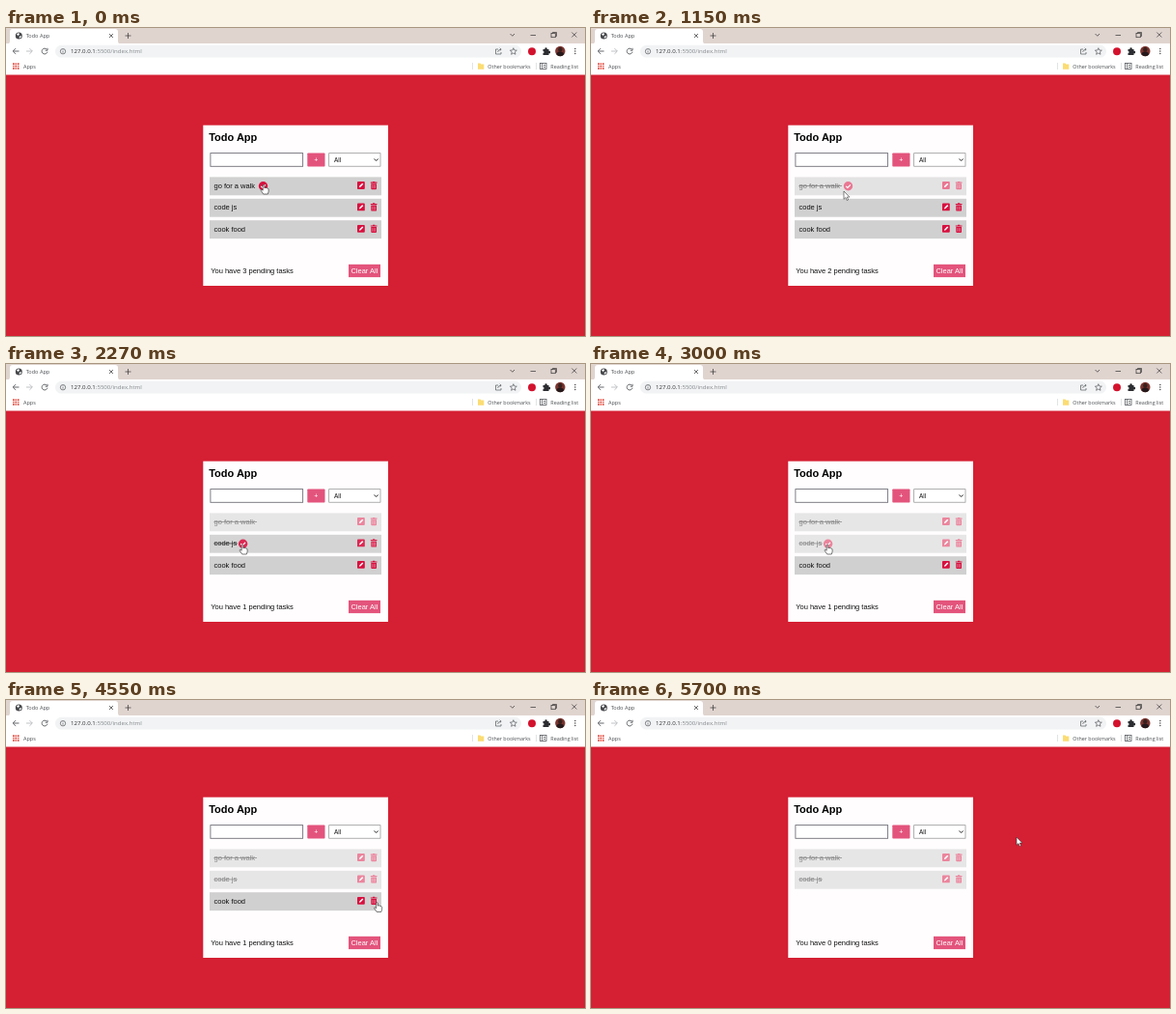
Write an HTML page that moves like this. It is 600x319 px and loops after 5730 ms.

```html
<!DOCTYPE html>
<html lang="en">
<head>
<meta charset="utf-8">
<title>Todo App</title>
<style>
  html, body { margin: 0; width: 100%; height: 100%; overflow: hidden; background: #d51f33; }
  svg { display: block; width: 600px; height: 319px; }
  text { font-family: "Liberation Sans", Arial, sans-serif; font-size: 7.5px; fill: #111; white-space: pre; }
  .ui { font-family: "Open Sans", "Noto Sans", sans-serif; font-size: 5.4px; fill: #4a4d51; }
  .line { fill: none; stroke: #55585c; stroke-width: .9; }
  .dark { fill: none; stroke: #333; stroke-width: .7; }
</style>
</head>
<body>
<svg viewBox="0 0 600 319">
  <rect width="600" height="319" fill="#d51f33"/>

  <g id="browser">
    <rect width="600" height="16.5" fill="#e0d4cf"/>
    <path d="M1 16.5q3 0 3-3V4q0-3 3-3H113q3 0 3 3v9.500q0 3 3 3z" fill="#fff"/>
    <rect y="16" width="600" height="32.500" fill="#fff"/>
    <circle cx="13.300" cy="8" r="3.500" fill="#47494c"/>
    <path d="M11 6.500l2-1.500 1 1.500-1.500 1.500zM13.500 9l2-1 .4 1.300-1.600 1.500z" fill="#fff"/>
    <text class="ui" x="20.700" y="10.200" style="font-size:5.550px">Todo App</text>
    <path class="dark" d="M107 6l4 4m0-4l-4 4M123.500 8h6m-3-3v6"/>
    <path class="dark" d="M522.500 6l2.300 2.300L527 6M543.500 7.500h5.500M586.300 4.500l5 5m0-5l-5 5M566.500 5.500v-1h4v4h-1"/>
    <rect class="dark" x="565" y="5.500" width="4.300" height="4.200"/>

    <path class="line" d="M13.500 24H7.300m2.800-2.900L7.200 24l2.900 2.900"/>
    <path class="line" d="M21 24h6.200m-2.800-2.900L27.300 24l-2.900 2.900" style="stroke:#b9bbbe"/>
    <path class="line" d="M42.300 22.200a2.900 2.900 0 1 0 .6 2.500M43 20.800v2.400h-2.400"/>
    <rect x="51" y="17.800" width="483" height="12.700" rx="6.350" fill="#f1f3f4"/>
    <circle class="line" cx="59" cy="24.200" r="2.700" style="stroke-width:.7"/>
    <path class="line" d="M59 23.800v1.800m0-3v.6" style="stroke-width:.7"/>
    <text class="ui" x="67" y="26.400" style="font-size:6.100px;fill:#85888c"><tspan fill="#303134">127.0.0.1</tspan>:5500/index.html</text>
    <path class="line" d="M510 22h-2.500v5h5.500v-2M509.500 25q.5-2.800 3.500-2.800m-1.300-1.400l1.500 1.400-1.500 1.400" style="stroke-width:.7"/>
    <path class="line" d="M525.800 20.700l1 2.300 2.500.2-1.900 1.600.6 2.500-2.200-1.300-2.200 1.300.6-2.500-1.900-1.600 2.500-.2z" style="stroke-width:.7"/>
    <circle cx="545" cy="24.200" r="4" fill="#d3122d"/>
    <path d="M556.500 22h1.800a1.300 1.300 0 1 1 2.500 0h1.700v1.800a1.300 1.300 0 1 1 0 2.500v1.700h-6v-1.900a1.100 1.100 0 1 0 0-2.200z" fill="#2c2d30"/>
    <circle cx="574.300" cy="24" r="5.200" fill="#7b352f"/>
    <path d="M570.300 27.300q1-3 3.800-3 3 0 4.200 3a5.200 5.200 0 0 1-8 0z" fill="#25191b"/>
    <circle cx="574.300" cy="22.300" r="2.200" fill="#38211f"/>
    <g fill="#444"><circle cx="589.800" cy="21.500" r=".75"/><circle cx="589.800" cy="24" r=".75"/><circle cx="589.800" cy="26.500" r=".75"/></g>

    <g id="dots"></g>
    <text class="ui" x="18" y="41.500" style="font-size:5.500px">Apps</text>
    <path d="M483.500 36v7M549.500 36v7" stroke="#d5d7da" stroke-width=".7"/>
    <path d="M489 36.500h2.500l.8 1h3v5.300H489z" fill="#fbdc74"/>
    <text class="ui" x="499.300" y="41.500">Other bookmarks</text>
    <rect class="line" x="553.500" y="36.500" width="6.500" height="6" style="stroke-width:.8"/>
    <path class="line" d="M555.600 36.500v6M557 38.500h2m-2 2h2" style="stroke-width:.8"/>
    <text class="ui" x="564.300" y="41.500">Reading list</text>
  </g>

  <g id="panel">
    <rect x="204.300" y="100.700" width="191.700" height="166.300" fill="#fffdfe"/>
    <text x="210.200" y="117" style="font-size:11px;font-weight:700;fill:#000">Todo App</text>
    <rect x="211.900" y="129.600" width="95.700" height="13.700" fill="#fff" stroke="#707078" stroke-width=".9"/>
    <rect x="312.300" y="129.400" width="18.200" height="14.200" rx=".8" fill="#e3547c"/>
    <text x="321.400" y="138.800" text-anchor="middle" style="font-size:7px;fill:#fff">+</text>
    <rect x="334.700" y="129.700" width="53.300" height="13.500" fill="#fff" stroke="#8c8c8c" stroke-width=".7"/>
    <text x="340" y="138.800" style="font-size:6.400px">All</text>
    <path d="M381.600 135.500l2 2 2-2" fill="none" stroke="#222" stroke-width="1"/>
    <text id="count" x="212.200" y="254"></text>
    <rect x="355" y="244.800" width="33" height="13.300" fill="#e3547c"/>
    <text x="357.400" y="254.200" style="fill:#fff">Clear All</text>
  </g>

  <g id="rows"></g>

  <g id="cursor">
    <path id="arrow" d="M0 0v8.300l1.900-1.700 1.300 2.900 1.400-.6-1.300-2.800h2.600z" fill="#fff" stroke="#333" stroke-width=".6"/>
    <path id="hand" d="M-.8.600q.8-1.100 1.600 0v3l1.300-.2 1.300.4 1.200.4.500.8v2.300l-.8 2.700H-.3L-2.700 6.500q-.5-1.200.5-1.200l1.400.9z" fill="#fff" stroke="#333" stroke-width=".65" stroke-linejoin="round"/>
  </g>
</svg>

<script>
const LOOP = 5730, FADE = 500;
const $ = id => document.getElementById(id);
const CRIMSON = "#d8103f";

// done: time ticked off; gone: time deleted
const tasks = [
  { label: "go for a walk", y: 154.4, checkX: 266.5, strikeEnd: 260, done: 850 },
  { label: "code js", y: 176.8, checkX: 245.6, strikeEnd: 239.8, done: 2190 },
  { label: "cook food", y: 199.2, gone: 5160 }
];

// time, x, y, hand pointer
const path = [
  [0, 267, 162, 1], [880, 267, 162, 1], [1060, 263, 168, 0], [1150, 262, 169, 0],
  [1350, 256, 179, 0], [1600, 245, 187, 1], [3150, 245, 187, 1], [3260, 253, 189, 0],
  [3900, 357, 196, 0], [4050, 357, 196, 0], [4500, 384.5, 209.5, 1],
  [5250, 384.5, 209.5, 1], [5330, 392, 200, 0], [5650, 441, 142, 0], [LOOP, 441, 142, 0]
];

$("dots").innerHTML = Array.from({ length: 9 }, (_, i) =>
  `<rect x="${7 + i % 3 * 2.4}" y="${36.3 + Math.floor(i / 3) * 2.4}" width="1.7" height="1.7" fill="${i % 2 ? "#e9685c" : "#d9473d"}"/>`).join("");

function rowMarkup({ label, y, checkX, strikeEnd }) {
  const strike = strikeEnd
    ? `<path class="strike" d="M215.500 ${y + 9.1}H${strikeEnd}" stroke="#111" stroke-width=".7"/>` : "";
  const check = checkX
    ? `<g class="check"><circle cx="${checkX}" cy="${y + 9.4}" r="4.700" fill="${CRIMSON}"/>
       <path d="M${checkX - 2.3} ${y + 9.4}l1.700 1.700 3-3.100" fill="none" stroke="#fff" stroke-width="1.200"/></g>` : "";
  return `<g>
    <rect x="211" y="${y}" width="178" height="18.900" fill="#d0d0d0"/>
    <text x="215.500" y="${y + 11.3}">${label}</text>${strike}${check}
    <g transform="translate(364 ${y + 4.7})">
      <rect width="7.800" height="7.800" rx=".9" fill="${CRIMSON}"/>
      <path d="M2 5.900l.3-1.400 2.900-2.900 1.100 1.100-2.900 2.900z" fill="#fff"/>
    </g>
    <g transform="translate(377.800 ${y + 4.5})" fill="${CRIMSON}">
      <path d="M0 .7h2l.4-.7h1.900l.4.700h2v1.100H0zM.5 2.300h5.700v5.100q0 .9-.9.900H1.400q-.9 0-.9-.9z"/>
      <path d="M2 3.400v3.800m1.350-3.800v3.800m1.350-3.800v3.800" stroke="#e9a9b9" stroke-width=".5"/>
    </g></g>`;
}
$("rows").innerHTML = tasks.map(rowMarkup).join("");
tasks.forEach((task, i) => {
  task.el = $("rows").children[i];
  task.strike = task.el.querySelector(".strike");
  task.check = task.el.querySelector(".check");
});

// CSS "ease": cubic-bezier(.25, .1, .25, 1)
function ease(x) {
  if (x <= 0) return 0;
  if (x >= 1) return 1;
  const bez = (s, a, b) => 3 * (1 - s) ** 2 * s * a + 3 * (1 - s) * s * s * b + s ** 3;
  let lo = 0, hi = 1;
  for (let i = 0; i < 20; i++) {
    const mid = (lo + hi) / 2;
    if (bez(mid, .25, .25) < x) lo = mid; else hi = mid;
  }
  return bez(lo, .1, 1);
}

function pointerAt(t) {
  const i = path.findIndex(p => p[0] > t);
  const a = path[i - 1], b = path[i];
  const u = (t - a[0]) / (b[0] - a[0]), k = u * u * (3 - 2 * u);
  return { x: a[1] + (b[1] - a[1]) * k, y: a[2] + (b[2] - a[2]) * k, hand: a[3] };
}

const show = (el, on) => el.style.visibility = on ? "visible" : "hidden";

function draw(t) {
  const p = pointerAt(t);
  $("cursor").setAttribute("transform", `translate(${p.x} ${p.y})`);
  show($("hand"), p.hand);
  show($("arrow"), !p.hand);

  let pending = 0;
  for (const task of tasks) {
    const { el, y, done, gone } = task;
    if (done) {
      el.setAttribute("opacity", 1 - .5 * ease((t - done) / FADE));
      show(task.strike, t >= done);
      show(task.check, p.x < task.checkX + 6 && p.y >= y && p.y < y + 19);
      if (t < done) pending++;
    } else {
      const fall = ease((t - gone) / FADE);
      el.setAttribute("opacity", 1 - fall);
      el.setAttribute("transform", `translate(0 ${44 * fall}) rotate(${20 * fall} 300 ${y + 9.45})`);
      if (t < gone + FADE) pending++;
    }
  }
  $("count").textContent = `You have ${pending} pending tasks`;
}

const start = performance.now();
function tick() {
  draw((performance.now() - start) % LOOP);
  requestAnimationFrame(tick);
}
tick();
</script>
</body>
</html>
```
